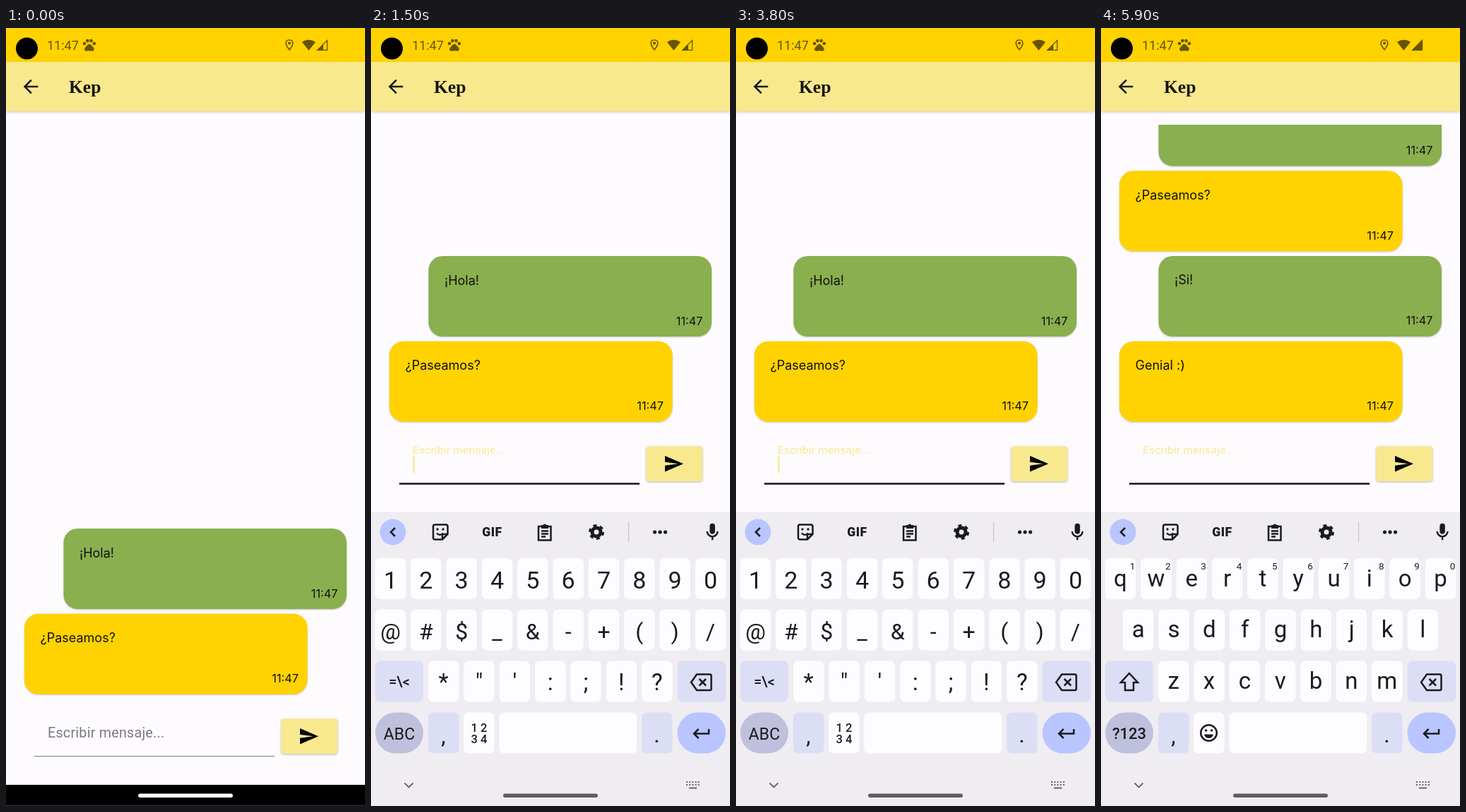
Write an HTML page that moves like this. It is 508 px wide and 1102 px high and loops after 6 s.

```html
<!DOCTYPE html>
<html lang="es">
<head>
<meta charset="utf-8">
<title>Chat</title>
<style>
html, body { margin: 0; width: 100%; height: 100%; overflow: hidden; background: #fefbff; }
svg { display: block; width: 508px; height: 1102px; }
text { white-space: pre; }
.chat text, .typed { font: 18px Inter, "Open Sans", sans-serif; fill: #111; }
.chat .time { font-size: 16.3px; text-anchor: end; }
.chat rect { filter: drop-shadow(0 1px 1px rgba(0,0,0,.22)); }
.board text { font-family: Roboto, sans-serif; text-anchor: middle; fill: #1b1b1f; }
.line { fill: none; stroke: #1b1b1f; stroke-width: 2.5; }
.ink { fill: #1b1b1f; }
.status { fill: #665500; }

/* One loop is 6 s, so 1% = 60 ms */
.chat, .field, .board, .edge, .pill, .idle, .focus, .cursor, .alpha, .symbols,
.tools, .hints, .signal, .si, .genial, .typed tspan {
  animation: 6s step-end infinite;
}
.chat { animation-name: chat; }
.field { animation-name: field; }
.board { animation-name: board; }
.edge { animation-name: edge; }
.pill { animation-name: pill; }
.idle { animation-name: idle; }
.focus { animation-name: focus; }
.label { animation: label 6s linear infinite; }
.cursor { animation-name: cursor; }
.alpha { animation-name: alpha; }
.symbols { animation-name: symbols; }
.tools { animation-name: tools; }
.hints { animation-name: hints; }
.signal, .genial { animation-name: late; }
.si { animation-name: si; }
.typed .c1 { animation-name: c1; }
.typed .c2 { animation-name: c2; }
.typed .c3 { animation-name: c3; }
.typed .c4 { animation-name: c4; }
.typed .c2, .typed .c3 { text-decoration: underline; text-decoration-thickness: 1px; }

@keyframes chat {
  0% { transform: translateY(386px); }
  4.99% { transform: translateY(0); }
  73.3% { transform: translateY(-120.7px); }
  94.99%, 100% { transform: translateY(-241.4px); }
}
@keyframes field {
  0% { transform: translateY(386px); }
  4.99%, 100% { transform: translateY(0); }
}
@keyframes board {
  0% { transform: translateY(430px); }
  4.99% { transform: translateY(240px); }
  6.66% { transform: translateY(70px); }
  8.33% { transform: translateY(15px); }
  9.99%, 100% { transform: translateY(0); }
}
@keyframes label {
  0%, 1.66% { transform: translate(59px, 619px) scale(1.27); fill: #7c7a80; }
  4.99%, 100% { transform: translate(59px, 602.5px) scale(1); fill: #f8e98e; }
}
@keyframes cursor {
  0% { visibility: hidden; transform: none; }
  4.99% { visibility: visible; }
  13.33% { visibility: hidden; }
  21.66% { visibility: visible; transform: none; }
  31.66% { visibility: visible; transform: translateX(5px); }
  36.66% { visibility: visible; transform: translateX(16px); }
  44.99% { visibility: hidden; transform: translateX(16px); }
  48.33% { visibility: visible; transform: translateX(21px); }
  54.99% { visibility: visible; transform: translateX(26px); }
  59.99% { visibility: visible; transform: none; }
  68.33% { visibility: hidden; }
  76.66% { visibility: visible; }
  84.99% { visibility: hidden; }
  93.33% { visibility: visible; }
  96.66%, 100% { visibility: hidden; transform: none; }
}
@keyframes edge { 0% { visibility: visible; } 9.99%, 100% { visibility: hidden; } }
@keyframes pill { 0% { fill: #fff; } 14.99%, 100% { fill: #5f5d63; } }
@keyframes idle { 0% { visibility: visible; } 1.66%, 100% { visibility: hidden; } }
@keyframes focus { 0% { visibility: hidden; } 1.66%, 100% { visibility: visible; } }
@keyframes alpha { 0% { visibility: visible; } 18.33% { visibility: hidden; } 66.66%, 100% { visibility: visible; } }
@keyframes symbols { 0% { visibility: hidden; } 18.33% { visibility: visible; } 66.66%, 100% { visibility: hidden; } }
@keyframes tools { 0% { visibility: visible; } 36.66% { visibility: hidden; } 54.99%, 100% { visibility: visible; } }
@keyframes hints { 0% { visibility: hidden; } 36.66% { visibility: visible; } 54.99%, 100% { visibility: hidden; } }
@keyframes si { 0% { visibility: hidden; } 73.3%, 100% { visibility: visible; } }
@keyframes late { 0% { visibility: hidden; } 94.99%, 100% { visibility: visible; } }
@keyframes c1 { 0% { visibility: hidden; } 31.66% { visibility: visible; } 59.99%, 100% { visibility: hidden; } }
@keyframes c2 { 0% { visibility: hidden; } 36.66% { visibility: visible; } 59.99%, 100% { visibility: hidden; } }
@keyframes c3 { 0% { visibility: hidden; } 48.33% { visibility: visible; } 59.99%, 100% { visibility: hidden; } }
@keyframes c4 { 0% { visibility: hidden; } 54.99% { visibility: visible; } 59.99%, 100% { visibility: hidden; } }
</style>
</head>
<body>
<svg viewBox="0 0 508 1102">
  <defs>
    <clipPath id="list"><rect y="137" width="508" height="830"/></clipPath>
    <linearGradient id="fade" x2="0" y2="1">
      <stop stop-color="#efedf1" stop-opacity=".2"/><stop offset="1" stop-color="#efedf1"/>
    </linearGradient>
  </defs>
  <rect width="508" height="1102" fill="#fefbff"/>

  <g clip-path="url(#list)"><g class="chat" id="chat"></g></g>

  <g class="field">
    <path class="idle" d="M40 645.5H380" stroke="#7c7a80" stroke-width="1.2"/>
    <path class="focus" d="M40 645.5H380" stroke="#1a0f1a" stroke-width="2.6"/>
    <text class="label" font-family="Roboto, sans-serif" font-size="15.5" letter-spacing=".2">Escribir mensaje...</text>
    <text class="typed" x="59" y="626"><tspan class="c1">¡</tspan><tspan class="c2">S</tspan><tspan class="c3">i</tspan><tspan class="c4">!</tspan></text>
    <rect class="cursor" x="59.3" y="607" width="2.4" height="23.5" fill="#f8e98e"/>
    <rect x="389.5" y="592.5" width="79.5" height="49.5" rx="4" fill="#f8e98e" style="filter:drop-shadow(0 1.5px 1.5px rgba(0,0,0,.3))"/>
    <path d="M2 21L23 12 2 3v7l15 2-15 2z" transform="translate(413.5 602.4) scale(1.24)"/>
  </g>

  <rect y="48" width="508" height="70" fill="#f8e98e" style="filter:drop-shadow(0 1px 2px rgba(0,0,0,.22))"/>
  <rect width="508" height="48" fill="#ffd200"/>
  <circle cx="29.5" cy="29" r="15.5"/>
  <g class="status">
    <text x="58" y="31" font-family="Roboto, sans-serif" font-size="18">11:47</text>
    <g transform="translate(107.6 13.8) scale(.86)">
      <circle cx="4" cy="9.5" r="2.7"/><circle cx="9" cy="5" r="2.7"/><circle cx="15" cy="5" r="2.7"/><circle cx="20" cy="9.5" r="2.7"/>
      <path d="M12 10.5c-3 0-4 3-6.4 5.2-2.6 2.5-1.6 6 1.2 6.3 1.6.1 3-.5 5.2-.5s3.600.6 5.200.5c2.800-.3 3.800-3.800 1.200-6.300C16 13.500 15 10.500 12 10.500z"/>
    </g>
    <g transform="translate(391.400 14.300) scale(.8)">
      <path d="M12 3C8.700 3 6 5.700 6 9c0 4.500 6 11.500 6 11.500S18 13.500 18 9c0-3.300-2.700-6-6-6z" fill="none" stroke="#665500" stroke-width="2"/>
      <circle cx="12" cy="9" r="2.5"/>
    </g>
    <path d="M12 21.500L23.600 7C23.200 6.700 18.700 3 12 3S.8 6.700.4 7z" transform="translate(418.600 14.200) scale(.82)"/>
    <path d="M440.700 31.300H454.500V17.500z" fill="none" stroke="#665500" stroke-width="1.300"/>
    <path d="M440 32H449V23z"/>
    <path class="signal" d="M439.500 32H455V16z"/>
  </g>
  <path d="M20 11H7.830l5.590-5.590L12 4l-8 8 8 8 1.410-1.410L7.830 13H20z" fill="#1b1b1f" transform="translate(19.500 67.500) scale(1.290)"/>
  <text x="89" y="92" font-family="'Liberation Serif', serif" font-weight="700" font-size="25.500" fill="#15150f">Kep</text>

  <rect y="1072" width="508" height="30"/>

  <g class="board">
    <rect class="edge" y="671" width="508" height="14" fill="url(#fade)"/>
    <rect y="685.500" width="508" height="420" fill="#efedf1"/>
    <circle cx="31" cy="714" r="18.500" fill="#b9c5ff"/>
    <g class="tools">
      <path class="line" d="M34 708l-6 6 6 6"/>
      <path class="line" d="M101 724.500H90.500a2.500 2.500 0 0 1-2.500-2.500V706a2.500 2.500 0 0 1 2.500-2.500H106a2.500 2.500 0 0 1 2.500 2.500V717zV717h7.500M93 715.500q4.500 5 9 0"/>
      <circle class="ink" cx="94" cy="710" r="1.700"/><circle class="ink" cx="102" cy="710" r="1.700"/>
      <text x="171.500" y="720" font-size="17.500" font-weight="900" letter-spacing=".6">GIF</text>
      <path class="line" d="M237 706H254.500V725.500H237zM241 712.500h10M241 716.500h10M241 720.500h6"/>
      <path class="ink" d="M241 704h2.500a2.600 2.600 0 0 1 4.800 0H251v5H241z"/>
      <circle class="line" cx="319" cy="714" r="6" style="stroke-width:5"/>
      <circle class="line" cx="319" cy="714" r="9.300" style="stroke-width:3.400" stroke-dasharray="4.900 4.839"/>
      <path d="M364.500 700V728" stroke="#c8c6cc" stroke-width="1.300"/>
      <g class="ink"><circle cx="401.500" cy="714" r="2.600"/><circle cx="409" cy="714" r="2.600"/><circle cx="416.500" cy="714" r="2.600"/></g>
    </g>
    <g class="hints">
      <path class="line" d="M28 708l6 6-6 6"/>
      <path d="M178.500 699V728M327.500 699V728" stroke="#c8c6cc" stroke-width="1.300"/>
      <text x="112" y="723" font-size="23">S</text>
      <text x="252" y="723" font-size="23">A</text>
      <text x="393" y="723" font-size="23">So</text>
    </g>
    <g transform="translate(468.200 699.300) scale(1.240)">
      <rect class="ink" x="9" y="2" width="6" height="12" rx="3"/>
      <path class="line" d="M6 11a6 6 0 0 0 12 0M12 17v4" style="stroke-width:2"/>
    </g>
    <g id="keys"></g>
    <g class="alpha" id="alpha">
      <path class="line" d="M40 914L28 927H34V938H46V927H52z"/>
      <circle class="line" cx="152.500" cy="998.500" r="11.300"/>
      <circle class="ink" cx="148.500" cy="995" r="1.800"/><circle class="ink" cx="156.500" cy="995" r="1.800"/>
      <path class="ink" d="M146 1000.500H159a6.600 6.600 0 0 1-13 0z"/>
    </g>
    <g class="symbols" id="symbols"></g>
    <path class="line" d="M461 915.500H479.500a2 2 0 0 1 2 2V936a2 2 0 0 1-2 2H461L453 926.700zM464.500 922l9.500 9.500m0-9.500l-9.500 9.500"/>
    <path class="line" d="M478 993V999.500H457M463.500 993l-6.500 6.500 6.500 6.500"/>
    <path d="M47.500 1069.500l6 6 6-6" fill="none" stroke="#66646a" stroke-width="1.800"/>
    <path d="M446 1068H465M446 1072H465" fill="none" stroke="#66646a" stroke-width="2" stroke-dasharray="2 2.200"/>
    <path d="M450 1076.500H461" stroke="#66646a" stroke-width="2"/>
  </g>
  <rect class="pill" x="187" y="1084.500" width="134" height="5.500" rx="2.750"/>
</svg>
<script>
const NS = "http://www.w3.org/2000/svg";
const $ = id => document.getElementById(id);

function add(parent, tag, attrs, text) {
  const el = document.createElementNS(NS, tag);
  for (const k in attrs) el.setAttribute(k, attrs[k]);
  if (text) el.textContent = text;
  parent.appendChild(el);
  return el;
}

// Chat bubbles
const messages = [["¡Hola!", true], ["¿Paseamos?", false], ["¡Si!", true, "si"], ["Genial :)", false, "genial"]];
messages.forEach(([msg, mine, cls], i) => {
  const g = add($("chat"), "g", { class: cls || "" });
  const x = mine ? 81.5 : 26, y = 323 + i * 120.7;
  add(g, "rect", { x, y, width: 400.5, height: 114, rx: 20, fill: mine ? "#8aaf4e" : "#ffd200" });
  add(g, "text", { x: x + 22.5, y: y + 40.5 }, msg);
  add(g, "text", { class: "time", x: x + 388, y: y + 97.5 }, "11:47");
});

// Keyboard
const STEP = 50.33, WHITE = "#fdfcfe", TINT = "#dcdef6";
const rowY = r => 751 + r * 72.8;
const label = (parent, x, y, s, size, weight = 400) =>
  add(parent, "text", { x, y, "font-size": size, "font-weight": weight }, s);
const key = (parent, x, r, w = 43.5, fill = WHITE, rx = 7) =>
  add(parent, "rect", { x, y: rowY(r), width: w, height: 58, rx, fill });

function row(parent, chars, first, r, base, size, draw) {
  [...chars].forEach((c, i) => {
    const x = first + i * STEP;
    if (draw) key(parent, x - 21.75, r);
    label(parent, x, rowY(r) + base, c, size);
  });
}

const keys = $("keys"), alpha = $("alpha"), symbols = $("symbols");
for (let i = 0; i < 10; i++) key(keys, 5.75 + i * STEP, 0);
for (let i = 0; i < 7; i++) key(keys, 81 + i * STEP, 2);
key(keys, 6, 2, 68, TINT);
key(keys, 433.5, 2, 68.5, TINT);
key(keys, 6, 3, 68, "#bfc1dc", 29);
key(keys, 81, 3, 43.5, TINT);
key(keys, 131, 3);
key(keys, 181.3, 3, 195);
key(keys, 383, 3, 43.5, TINT);
key(keys, 433.5, 3, 68.5, "#b9c5ff", 29);
label(keys, 102.5, 1013, ",", 32);
label(keys, 404.5, 1012, ".", 32);

row(alpha, "qwertyuiop", 27.5, 0, 39.5, 33);
row(alpha, "asdfghjkl", 52.7, 1, 39.5, 33, true);
row(alpha, "zxcvbnm", 102.7, 2, 39.5, 33);
[..."1234567890"].forEach((d, i) => label(alpha, 44.5 + i * STEP, 766.5, d, 13.5));
label(alpha, 40, 1007, "?123", 22, 500);

row(symbols, "1234567890", 27.5, 0, 43, 34);
row(symbols, "@#$_&-+()/", 27.5, 1, 42, 32, true);
row(symbols, "*\"':;!?", 102.7, 2, 41.5, 33);
label(symbols, 40, 933, "=\\<", 20, 500);
label(symbols, 40, 1007.5, "ABC", 23);
label(symbols, 153, 997, "1 2", 16.5, 500);
label(symbols, 153, 1012.5, "3 4", 16.5, 500);
</script>
</body>
</html>
```
